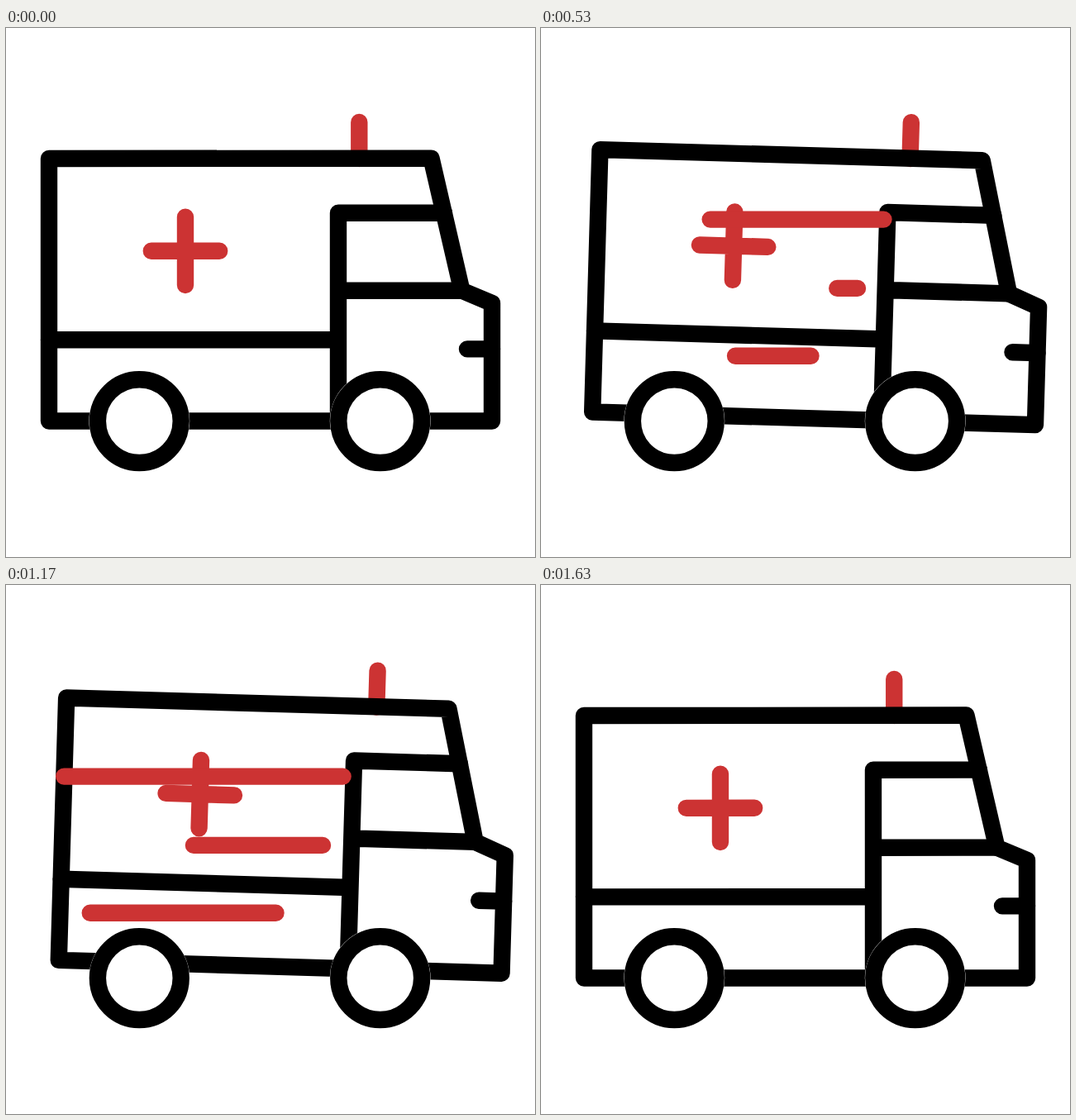
These frames come from a looping animation (640 px wide and 640 px high, 1670 ms). An HTML page:

```html
<!DOCTYPE html>
<html lang="en">
<head>
<meta charset="utf-8">
<title>Ambulance</title>
<style>
  html, body { margin: 0; height: 100%; overflow: hidden; background: #fff; }
  svg { display: block; width: 100vw; height: 100vh; }
  path, circle { fill: none; stroke: #000; stroke-width: 20.4; stroke-linecap: round; stroke-linejoin: round; }
  .red { stroke: #c33; }
  .gap { fill: #fff; stroke: none; }
</style>
</head>
<body>
<svg viewBox="0 0 640 640">
  <g id="van">
    <path class="red" d="M427.3 114V158"/>
    <path d="M52 158L514.5 157.6L551.5 317.7L588 333V475.5H52Z"/>
    <path d="M402 465V223.7H530M402 317.7H551M52 377.3H402M558 388.4H588"/>
    <path class="red" d="M175.8 269.8H258.2M217 228.6V311"/>
  </g>
  <g id="wheels">
    <circle class="gap" cx="161.3" cy="475.6" r="60.9"/>
    <circle cx="161.3" cy="475.6" r="50.4"/>
    <circle class="gap" cx="452.7" cy="475.6" r="60.9"/>
    <circle cx="452.7" cy="475.6" r="50.4"/>
  </g>
  <path id="streaks" class="red"/>
</svg>
<script>
const LOOP = 1670, FRAMES = 50, CYCLE = 16;
const van = document.getElementById('van');
const streaks = document.getElementById('streaks');

// Keyframes as [frame, value]
const shiftX = [[1, 0], [12, 13.2], [20, 16], [28, 13.2], [36, 16.3], [44, 0]];
const shiftY = [[1, 0], [12, 7.8], [20, -14], [28, 7.8], [36, -14], [46, 0]];
const tilt = [[1, 0], [12, 1.67], [36, 1.69], [44, -1.68], [49.5, 0]];

// Each streak grows leftwards from its head start, then shrinks from its tail start
const lines = [
  { y: 231.6, left: 64.2, right: 414.5, head: 10.8, tail: 17.9 },
  { y: 314.9, left: 130.6, right: 383, head: 13.7, tail: 20.9 },
  { y: 396.7, left: 74.2, right: 326.5, head: 12, tail: 18.9 }
];

function ease(p) {
  p = Math.min(1, Math.max(0, p));
  return p * p * p * (10 + p * (6 * p - 15));
}

function valueAt(keys, f) {
  let value = keys[0][1];
  for (let i = 1; i < keys.length; i++) {
    const [f0, v0] = keys[i - 1], [f1, v1] = keys[i];
    if (f > f0) value = v0 + (v1 - v0) * ease((f - f0) / (f1 - f0));
  }
  return value;
}

function streak({ y, left, right, head, tail }, f) {
  const grown = ease((f - head) / 9.4), gone = ease((f - tail) / 8.2);
  if (grown < 0.001 || gone > 0.999) return '';
  const x = p => right + (left - right) * p;
  return `M${x(grown)} ${y}H${x(gone) + 0.01}`;
}

function draw(now) {
  const f = Math.min(FRAMES - 1, Math.floor((now % LOOP) * 0.03 + 0.15));
  van.setAttribute('transform',
    `translate(${valueAt(shiftX, f)} ${valueAt(shiftY, f)}) rotate(${valueAt(tilt, f)} 320 320)`);
  streaks.setAttribute('d',
    lines.map(line => streak(line, f) + streak(line, f - CYCLE)).join(''));
}

const start = performance.now();
function tick() {
  draw(performance.now() - start);
  requestAnimationFrame(tick);
}
tick();
</script>
</body>
</html>
```
